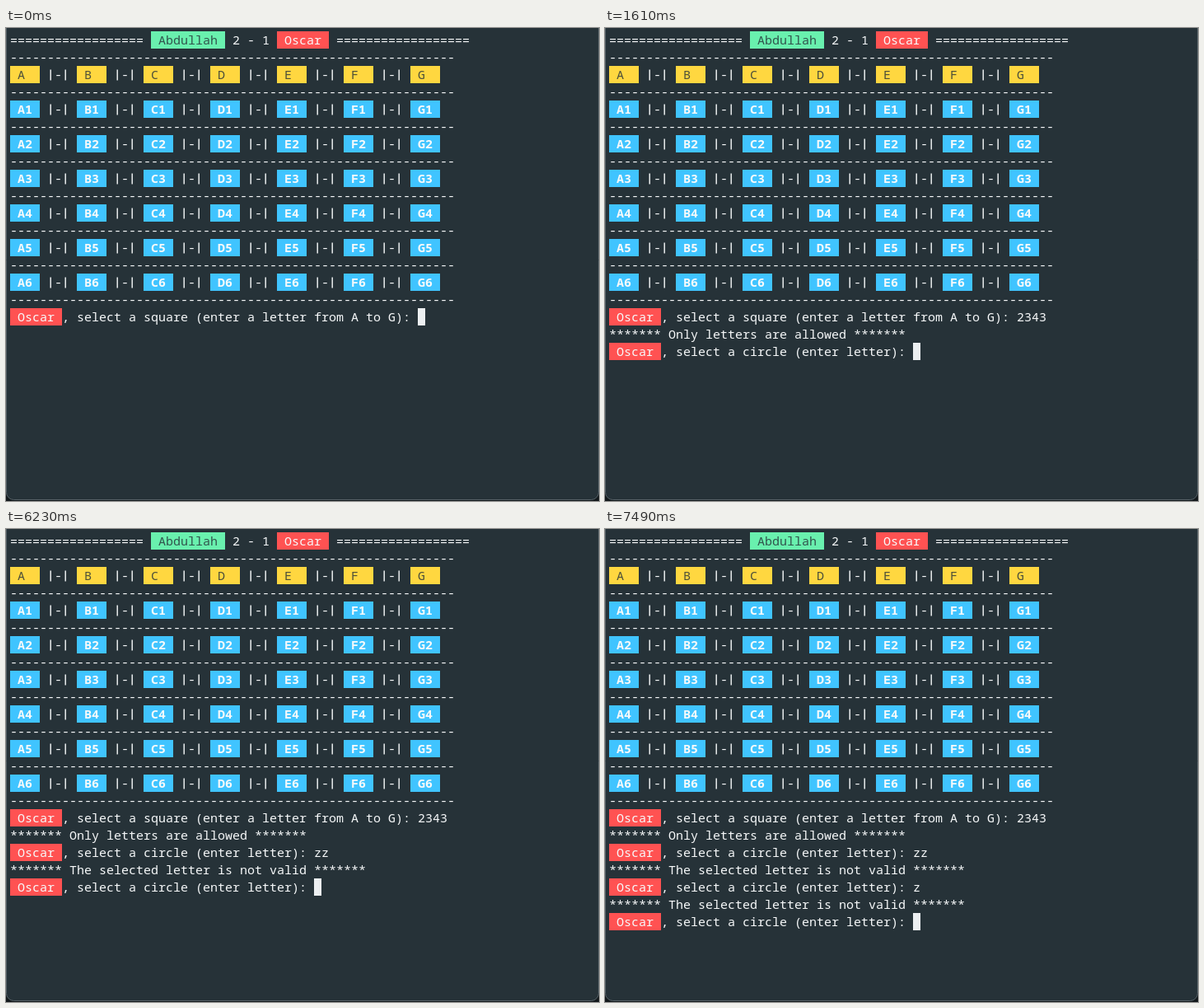
These frames come from a looping animation (720x574 px, 8680 ms). An HTML page with a canvas:

```html
<!DOCTYPE html>
<html lang="en">
<head>
<meta charset="utf-8">
<title>Connect four in a terminal</title>
<style>
  html, body { margin: 0; width: 100%; height: 100%; overflow: hidden; background: #12181b; }
  canvas { display: block; }
</style>
</head>
<body>
<canvas id="stage" width="720" height="574"></canvas>
<script>
const ctx = document.getElementById('stage').getContext('2d');
const CELL = 9, LINE = 21, LEFT = 5, TOP = 4, LOOP = 8680;
const FACE = '15px "Noto Sans Mono", "DejaVu Sans Mono", monospace';
const BACK = '#263238', WHITE = '#f7f9fa', DARK = 'rgba(38,50,56,.82)';
const GREEN = '#69f0ae', RED = '#ff5252', YELLOW = '#ffd740', BLUE = '#40c4ff';
const PLAYERS = ['Abdullah', 'Oscar'];
const SQUARE = ', select a square (enter a letter from A to G): ';
const CIRCLE = ', select a circle (enter letter): ';
const stars = text => `******* ${text} *******`;
const INVALID = stars('The selected letter is not valid');

// Each step: start time, then what has been entered at each prompt so far
const STEPS = [
  [0, ''], [630, '23'], [840, '234'], [910, '2343'],
  [1610, '2343', ''], [5600, '2343', 'z'], [5810, '2343', 'zz'],
  [6230, '2343', 'zz', ''], [7280, '2343', 'zz', 'z'],
  [7420, '2343', 'zz', 'z', '']
];

const px = col => LEFT + col * CELL;
const py = row => TOP + row * LINE;

function write(text, col, row, color = WHITE, weight = '') {
  ctx.font = `${weight} ${FACE}`;
  ctx.fillStyle = color;
  ctx.fillText(text, px(col), py(row) + 16);
  return col + text.length;
}

function block(col, row, width, color) {
  ctx.fillStyle = color;
  ctx.fillRect(px(col), py(row), width * CELL, LINE);
}

function badge(text, col, row, back, color = WHITE, weight = '') {
  block(col, row, text.length, back);
  return write(text, col, row, color, weight);
}

function divider(col, row) {
  write('-', col + 1, row);
  for (const c of [col, col + 2])
    ctx.fillRect(px(c) + 3.5, py(row) + 4.5, 1.4, 13);
}

function drawWindow() {
  ctx.fillStyle = '#12181b';
  ctx.fillRect(0, 0, 720, 574);
  ctx.beginPath();
  ctx.roundRect(0.5, -12, 719, 584.5, 9);
  ctx.fillStyle = BACK;
  ctx.fill();
  ctx.strokeStyle = '#566167';
  ctx.stroke();
}

function drawBoard() {
  const rule = '='.repeat(18);
  let col = write(rule + ' ', 0, 0);
  col = badge(` ${PLAYERS[0]} `, col, 0, GREEN, DARK);
  col = write(' 2 - 1 ', col, 0);
  col = badge(` ${PLAYERS[1]} `, col, 0, RED);
  write(' ' + rule, col, 0);

  for (let r = 0; r <= 7; r++) write('-'.repeat(60), 0, 2 * r + 1);
  for (let r = 0; r <= 6; r++) {
    [...'ABCDEFG'].forEach((letter, i) => {
      const row = 2 * r + 2;
      if (r) badge(` ${letter}${r} `, i * 9, row, BLUE, WHITE, 'bold');
      else badge(` ${letter}  `, i * 9, row, YELLOW, DARK);
      if (i < 6) divider(i * 9 + 5, row);
    });
  }
}

function drawPrompts(entries) {
  entries.forEach((entry, i) => {
    const row = 16 + 2 * i;
    if (i) write(i > 1 ? INVALID : stars('Only letters are allowed'), 0, row - 1);
    let col = badge(` ${PLAYERS[1]} `, 0, row, RED);
    col = write((i ? CIRCLE : SQUARE) + entry, col, row);
    if (i === entries.length - 1) block(col, row, 1, '#eceff1');
  });
}

function frame() {
  const t = performance.now() % LOOP;
  const [, ...entries] = STEPS.findLast(step => step[0] <= t);
  drawWindow();
  drawBoard();
  drawPrompts(entries);
  requestAnimationFrame(frame);
}
frame();
</script>
</body>
</html>
```
